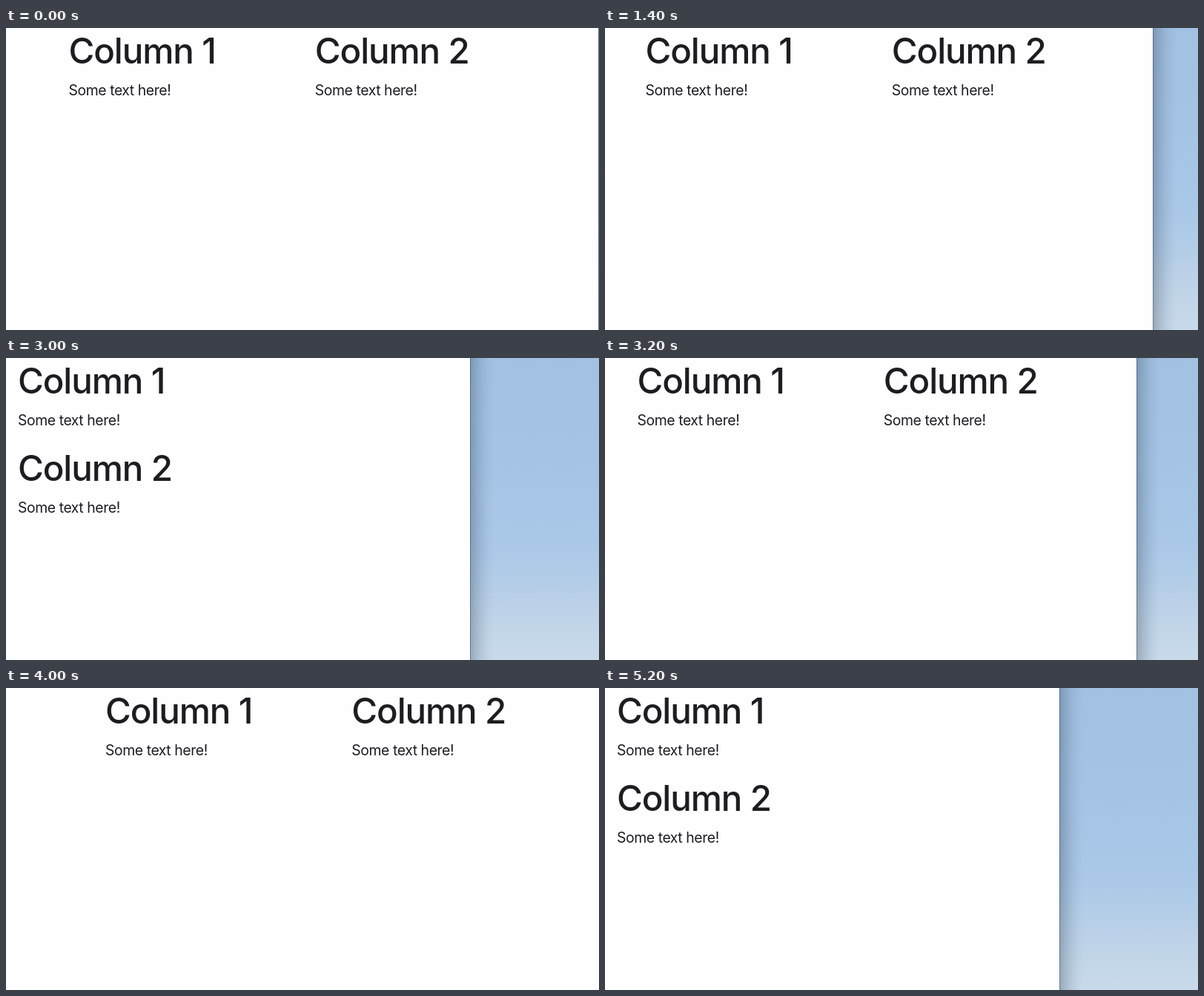
An HTML page that plays this animation: 800x408 px, repeating every 5600 ms.

```html
<!DOCTYPE html>
<html lang="en">
<head>
<meta charset="utf-8">
<title>Responsive columns</title>
<style>
  /* window width in pixels; the layout follows from it */
  @property --w {
    syntax: "<number>";
    inherits: true;
    initial-value: 799;
  }

  html, body {
    margin: 0;
    width: 100%;
    height: 100%;
    overflow: hidden;
  }

  .stage {
    /* 1 = side by side, 0 = stacked */
    --two: clamp(0, var(--w) - 697, 1);
    position: relative;
    width: 800px;
    height: 408px;
    overflow: hidden;
    background: linear-gradient(#a2c1e2, #a5c4e5 35%, #a9c7e7 60%, #b3cde7 74%, #c0d4e8 87%, #c8daea);
    animation: resize 5600ms step-end infinite;
  }

  .window {
    position: absolute;
    inset: 0 auto 0 0;
    width: calc(var(--w) * 1px);
    background: #fefdff;
  }

  .window::after {
    content: "";
    position: absolute;
    inset: 0 auto 0 100%;
    width: 32px;
    background: linear-gradient(90deg,
      rgba(30, 45, 60, .55) 1px, rgba(35, 55, 75, .29) 1px,
      rgba(35, 55, 75, .19) 8px, rgba(35, 55, 75, .09) 17px,
      rgba(35, 55, 75, .03) 25px, transparent);
  }

  svg {
    position: absolute;
    inset: 0;
    font-family: Inter, "Liberation Sans", sans-serif;
    fill: #1d1d20;
  }

  .page {
    transform: translateX(calc(16px + var(--two) * (var(--w) - 662) * .5px));
  }

  .second {
    transform: translate(calc(var(--two) * 332.3px), calc((1 - var(--two)) * 118px));
  }

  .title {
    font-size: 47.5px;
    font-weight: 500;
    letter-spacing: -1.1px;
  }

  .text {
    font-size: 19.4px;
    letter-spacing: -.43px;
  }

  @keyframes resize {
    0%     { --w: 799; }
    21.42% { --w: 790; }
    25%    { --w: 739; }
    28.57% { --w: 680; }
    32.14% { --w: 613; }
    53.57% { --w: 626; }
    57.14% { --w: 717; }
    60.71% { --w: 751; }
    64.28% { --w: 798; }
    67.85% { --w: 864; }
    71.42% { --w: 898; }
    75%    { --w: 899; }
    78.57% { --w: 845; }
    82.14% { --w: 713; }
    85.71%, 100% { --w: 613; }
  }
</style>
</head>
<body>
<div class="stage">
  <div class="window"></div>
  <svg width="800" height="408">
    <g class="page">
      <g>
        <text class="title" y="48">Column 1</text>
        <text class="text" y="91">Some text here!</text>
      </g>
      <g class="second">
        <text class="title" y="48">Column 2</text>
        <text class="text" y="91">Some text here!</text>
      </g>
    </g>
  </svg>
</div>
</body>
</html>
```
